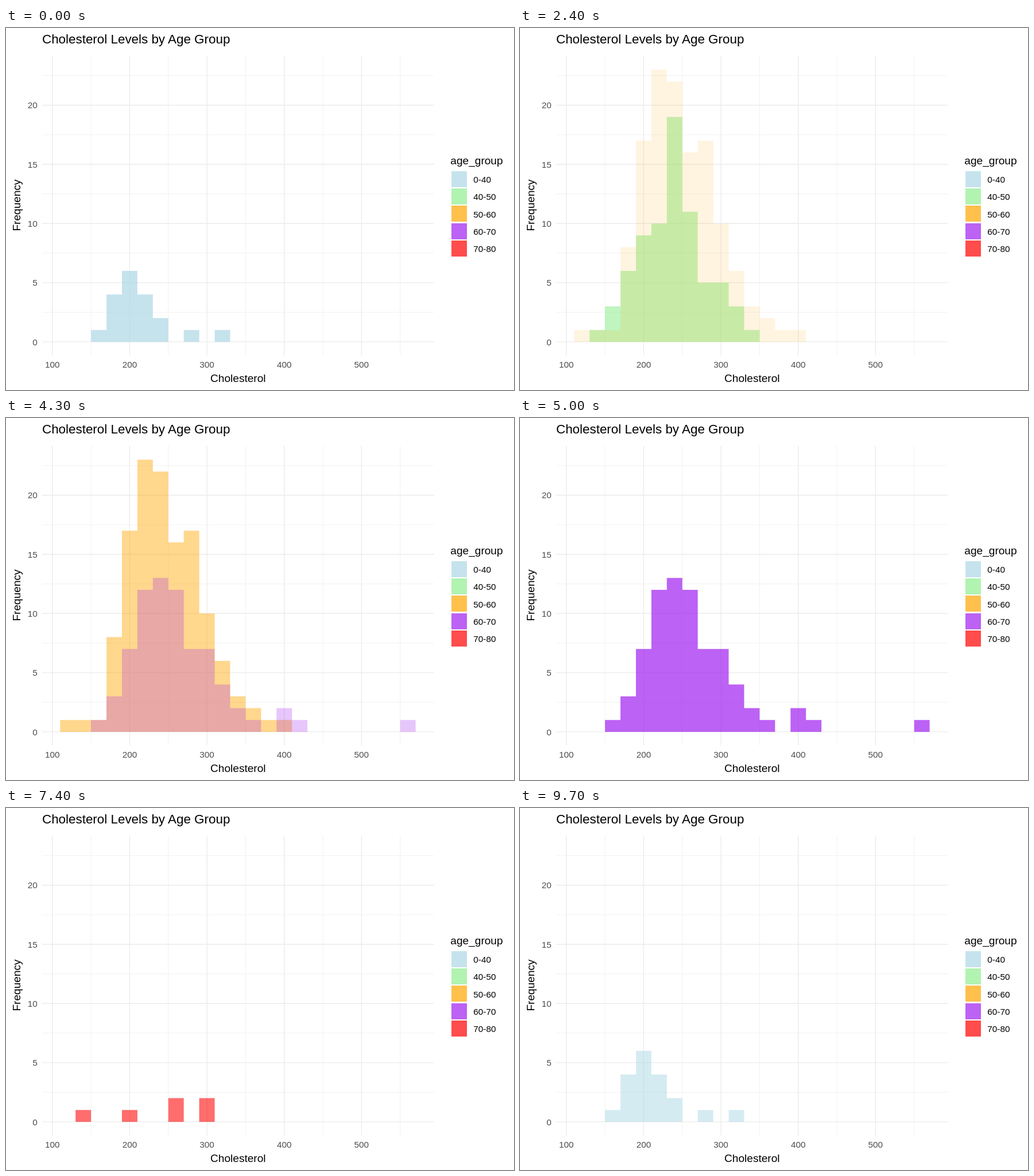
An HTML page that plays this animation: 885x632 px, repeating every 10 s.

```html
<!DOCTYPE html>
<html lang="en">
<head>
<meta charset="utf-8">
<title>Cholesterol Levels by Age Group</title>
<style>
  html, body { margin: 0; width: 100%; height: 100%; overflow: hidden; background: #fff; }
  svg { display: block; }
  text { font-family: "Liberation Sans", Arial, sans-serif; font-size: 19.1px; }
  .title { font-size: 22.4px; }
  .tick, .key { font-size: 15.3px; }
  .tick { fill: #4d4d4d; }
  .grid { stroke: #ebebeb; }
</style>
</head>
<body>
<svg id="chart" width="885" height="632" viewBox="0 0 885 632"></svg>
<script>
const LOOP = 10000, TICK = 100, TICKS = LOOP / TICK;
const ALPHA = 0.7, BIN = 20, FADE = 11;
const PANEL = { left: 63, right: 745.5, top: 48.5, bottom: 571.5 };

// Each histogram is a lopsided bell; `marks` are the bins that stand off the curve.
const groups = [
  { name: '0-40', color: '#add8e6', peak: 6, mode: 200, left: 22.2, right: 25,
    marks: { 280: 1, 320: 1 } },
  { name: '40-50', color: '#90ee90', peak: 12.5, mode: 235, left: 45, right: 49,
    marks: { 220: 10, 240: 19, 280: 5 } },
  { name: '50-60', color: '#ffa500', peak: 23, mode: 225, left: 31, right: 58,
    marks: { 120: 1, 160: 1, 260: 16, 280: 17, 400: 1 } },
  { name: '60-70', color: '#a020f0', peak: 13.49, mode: 240, left: 36, right: 51,
    marks: { 280: 7, 400: 2, 420: 1, 560: 1 } },
  { name: '70-80', color: '#ff0000', peak: 0, mode: 240, left: 1, right: 1,
    marks: { 140: 1, 200: 1, 260: 2, 300: 2 } }
];
const STATES = groups.length + 1; // the last state is empty

const svg = document.getElementById('chart');
const xAt = v => 94.25 + (v - 110) * 1.3465;
const yAt = n => 547.9 - n * 20.66;

function add(tag, attrs, text) {
  const el = document.createElementNS('http://www.w3.org/2000/svg', tag);
  for (const k in attrs) el.setAttribute(k, attrs[k]);
  if (text !== undefined) el.textContent = text;
  return svg.appendChild(el);
}

const label = (text, x, y, cls, anchor = 'start', extra = {}) =>
  add('text', { x, y, class: cls, 'text-anchor': anchor, ...extra }, text);

const gridX = (v, w) => add('path',
  { class: 'grid', 'stroke-width': w, d: `M${xAt(v)} ${PANEL.top}V${PANEL.bottom}` });
const gridY = (n, w) => add('path',
  { class: 'grid', 'stroke-width': w, d: `M${PANEL.left} ${yAt(n)}H${PANEL.right}` });

function drawAxes() {
  for (let v = 150; v <= 550; v += 100) gridX(v, 0.7);
  for (let n = 2.5; n < 23; n += 5) gridY(n, 0.7);
  for (let v = 100; v <= 500; v += 100) {
    gridX(v, 1.4);
    label(v, xAt(v), 593, 'tick', 'middle');
  }
  for (let n = 0; n <= 20; n += 5) {
    gridY(n, 1.4);
    label(n, 54.8, yAt(n) + 5.6, 'tick', 'end');
  }
  label('Cholesterol Levels by Age Group', 63, 27, 'title');
  label('Cholesterol', 404.3, 618, 'axis', 'middle');
  label('Frequency', 0, 0, 'axis', 'middle', { transform: 'translate(25 309.5) rotate(-90)' });
}

function drawLegend() {
  label('age_group', 774.3, 238, 'axis');
  groups.forEach((g, i) => {
    const y = 249.7 + i * 30.35;
    add('rect', { x: 775.7, y, width: 27.6, height: 27.8, fill: g.color,
      'fill-opacity': ALPHA, 'shape-rendering': 'crispEdges' });
    label(g.name, 814.3, y + 20.1, 'key');
  });
}

function countAt({ peak, mode, left, right, marks }, v) {
  const z = (v - mode) / (v < mode ? left : right);
  return marks[v] ?? Math.round(peak * Math.exp(-z * z / 2));
}

function drawBars(group) {
  let d = '';
  for (let v = 120; v <= 560; v += BIN) {
    const n = countAt(group, v);
    if (n) d += `M${xAt(v - BIN / 2)} ${yAt(0)}V${yAt(n)}H${xAt(v + BIN / 2)}V${yAt(0)}Z`;
  }
  return add('path', { d, fill: group.color });
}

drawAxes();
drawLegend();
const layers = groups.map(drawBars);

// Every state ends in a linear cross-fade to the next one; the faintest step is skipped.
function render() {
  const tick = Math.floor((performance.now() % LOOP) / TICK);
  const endOf = i => Math.floor(TICKS * (i + 1) / STATES);
  let state = 0;
  while (tick >= endOf(state)) state++;
  const step = FADE - (endOf(state) - tick);
  const mix = step < 2 ? 0 : step / FADE;
  layers.forEach((el, i) => {
    const weight = i === state ? 1 - mix : i === (state + 1) % STATES ? mix : 0;
    el.setAttribute('fill-opacity', ALPHA * weight);
  });
  requestAnimationFrame(render);
}
render();
</script>
</body>
</html>
```
